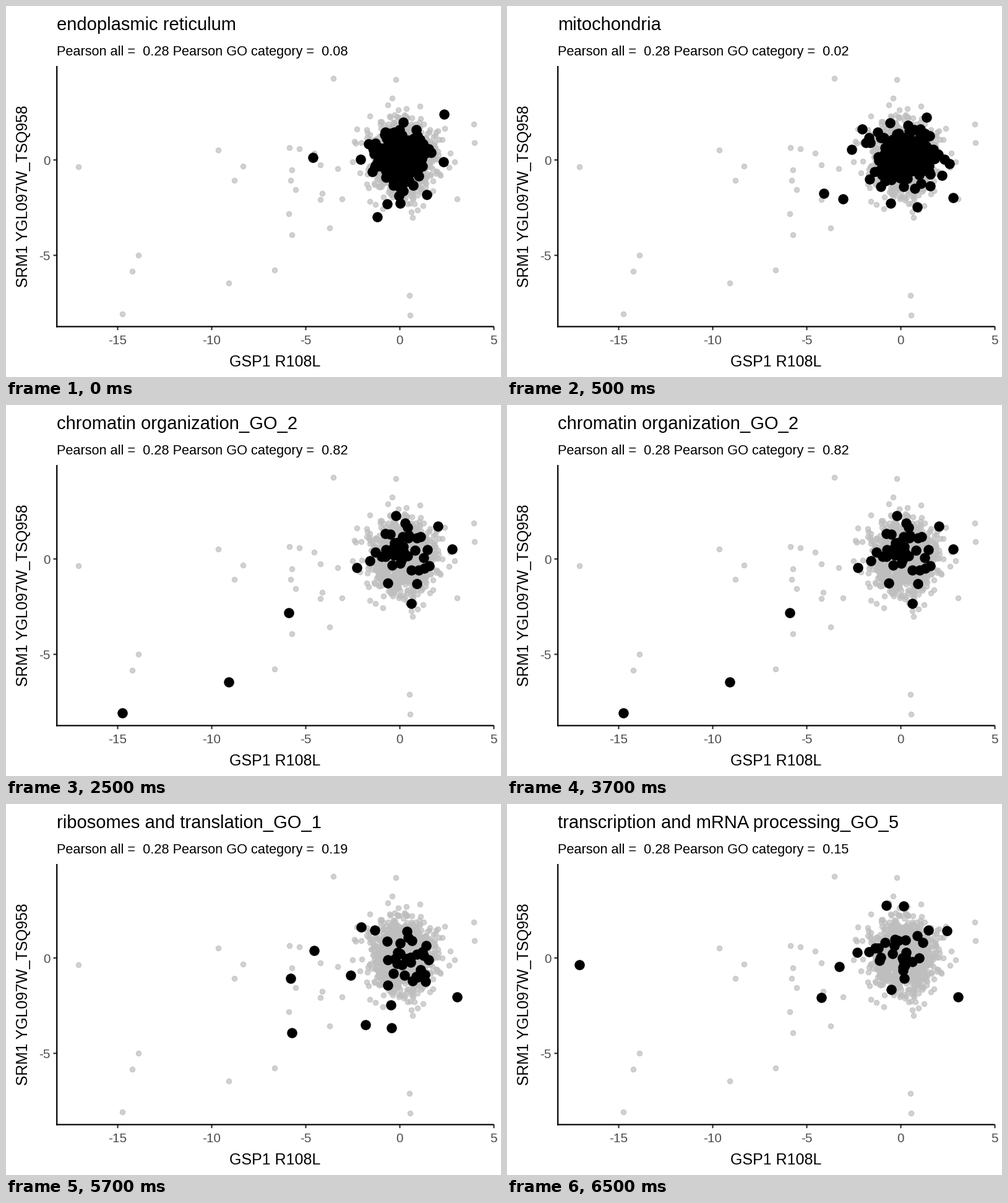
Animation, 800 px wide and 600 px high, one loop 8000 ms. Source, as a matplotlib script:

```python
import numpy as np
import matplotlib.pyplot as plt
from matplotlib.animation import FuncAnimation

WIDTH, HEIGHT, DPI = 800, 600, 100
PX = 72 / DPI                      # points per pixel
LEFT, RIGHT, TOP, BOTTOM = 81.7, 788, 96.5, 518
X0, Y0, X_UNIT, Y_UNIT = 636, 248.5, 30.4, 30.85
STEP_MS, STEPS = 500, 16

plt.rcParams["font.family"] = "Liberation Sans"


def cloud(seed, count, center, sigma, reach=2.6):
    """Normally distributed points, cut off at `reach` sigmas."""
    points = np.random.default_rng(seed).normal(size=(count, 2))
    points = points[np.hypot(*points.T) < reach]
    return points * sigma + center


# Isolated points far from the crowd, in stage pixels with y downwards.
OUTLIERS = [
    (116, 259), (213, 402), (203, 428), (187, 497), (359, 447), (433, 426),
    (342, 232), (382, 258), (368, 281), (461, 369), (456, 335), (467, 296),
    (459, 281), (461, 264), (457, 228), (473, 230), (497, 237), (507, 256),
    (510, 302), (507, 312), (522, 358), (535, 262), (542, 311), (528, 116),
    (629, 118), (755, 190), (756, 220), (728, 311), (651, 467), (652, 499),
]
CROWD = np.vstack([
    OUTLIERS,
    cloud(11, 850, (639, 245), (24, 26)),
    cloud(12, 300, (641, 245), (35, 36), 2.5),
    cloud(13, 32, (640, 250), (46, 56), 2.2),
])

# first step, title, correlation, key points, cloud around the middle
SCENES = [
    (0, "endoplasmic reticulum", 0.08,
     [(495, 244), (707, 174), (599, 340), (572, 247), (706, 251), (679, 304),
      (615, 319), (636, 318)],
     cloud(3, 220, (637, 242), (20, 22), 3)),
    (1, "mitochondria", 0.02,
     [(511, 302), (542, 311), (720, 309), (556, 231), (573, 198), (677, 179),
      (662, 324), (619, 318), (714, 254)],
     cloud(4, 250, (639, 244), (24, 21), 3)),
    (5, "chromatin organization_GO_2", 0.82,
     [(187, 497), (359, 447), (456, 335), (629, 178), (566, 262), (720, 232),
      (697, 195), (654, 320)],
     cloud(5, 36, (643, 244), (28, 27), 2.2)),
    (9, "ribosomes and translation_GO_1", 0.19,
     [(497, 236), (459, 281), (461, 369), (580, 356), (622, 361), (621, 324),
      (728, 311), (556, 276), (573, 198)],
     cloud(6, 32, (644, 242), (32, 25), 2.2)),
    (13, "transcription and mRNA processing_GO_5", 0.15,
     [(116, 259), (507, 312), (536, 262), (565, 239), (612, 163), (640, 164),
      (728, 311), (710, 204)],
     cloud(7, 27, (640, 245), (30, 27), 2.2)),
]

fig = plt.figure(figsize=(WIDTH / DPI, HEIGHT / DPI), dpi=DPI, facecolor="white")
ax = fig.add_axes([0, 0, 1, 1])
# Whole numbers fall on pixel centres.
ax.set(xlim=(-0.5, WIDTH - 0.5), ylim=(HEIGHT - 0.5, -0.5))
ax.axis("off")


def line(xs, ys, color):
    ax.plot(xs, ys, color=color, lw=2.2 * PX, solid_capstyle="butt",
            snap=False, zorder=3)


def label(x, y, text, size, color="black", **kwargs):
    return ax.text(x, y, text, fontsize=size * PX, color=color,
                   va="baseline", **kwargs)


def dots(points, radius, color, alpha, zorder):
    return ax.scatter(*np.transpose(points), s=(2 * radius * PX) ** 2, c=color,
                      edgecolors=color, linewidths=1.48 * PX, alpha=alpha,
                      zorder=zorder)


for value in range(-15, 6, 5):
    x = X0 + value * X_UNIT
    line([x, x], [BOTTOM, BOTTOM + 5.7], "#333333")
    label(x - 0.6, 546.5, str(value), 20.8, "#4D4D4D", ha="center")
for value in (0, -5):
    y = Y0 - value * Y_UNIT
    line([LEFT - 5.7, LEFT], [y, y], "#333333")
    label(71.5, y + 7.8, str(value), 20.8, "#4D4D4D", ha="right")
line([LEFT, LEFT], [TOP, BOTTOM + 1.1], "black")
line([LEFT - 1.1, RIGHT], [BOTTOM, BOTTOM], "black")

label(434.5, 582.5, "GSP1 R108L", 25, ha="center")
label(35, 307.5, "SRM1 YGL097W_TSQ958", 24.7, ha="center",
      rotation=90, rotation_mode="anchor")
title = label(81.5, 38.5, "", 29.17)
subtitle = label(81.5, 79.5, "", 21.75)

dots(CROWD, 4.07, "#BEBEBE", 0.7, 1)
highlight = dots(OUTLIERS, 7.5, "black", 1, 2)


def draw(step):
    _, name, r, keys, middle = [s for s in SCENES if s[0] <= step][-1]
    title.set_text(name)
    subtitle.set_text(f"Pearson all =  0.28 Pearson GO category =  {r:.2f}")
    highlight.set_offsets(np.vstack([keys, middle]))
    return title, subtitle, highlight


anim = FuncAnimation(fig, draw, frames=STEPS, interval=STEP_MS, repeat=True,
                     repeat_delay=0, init_func=lambda: draw(0))
plt.show()
```
